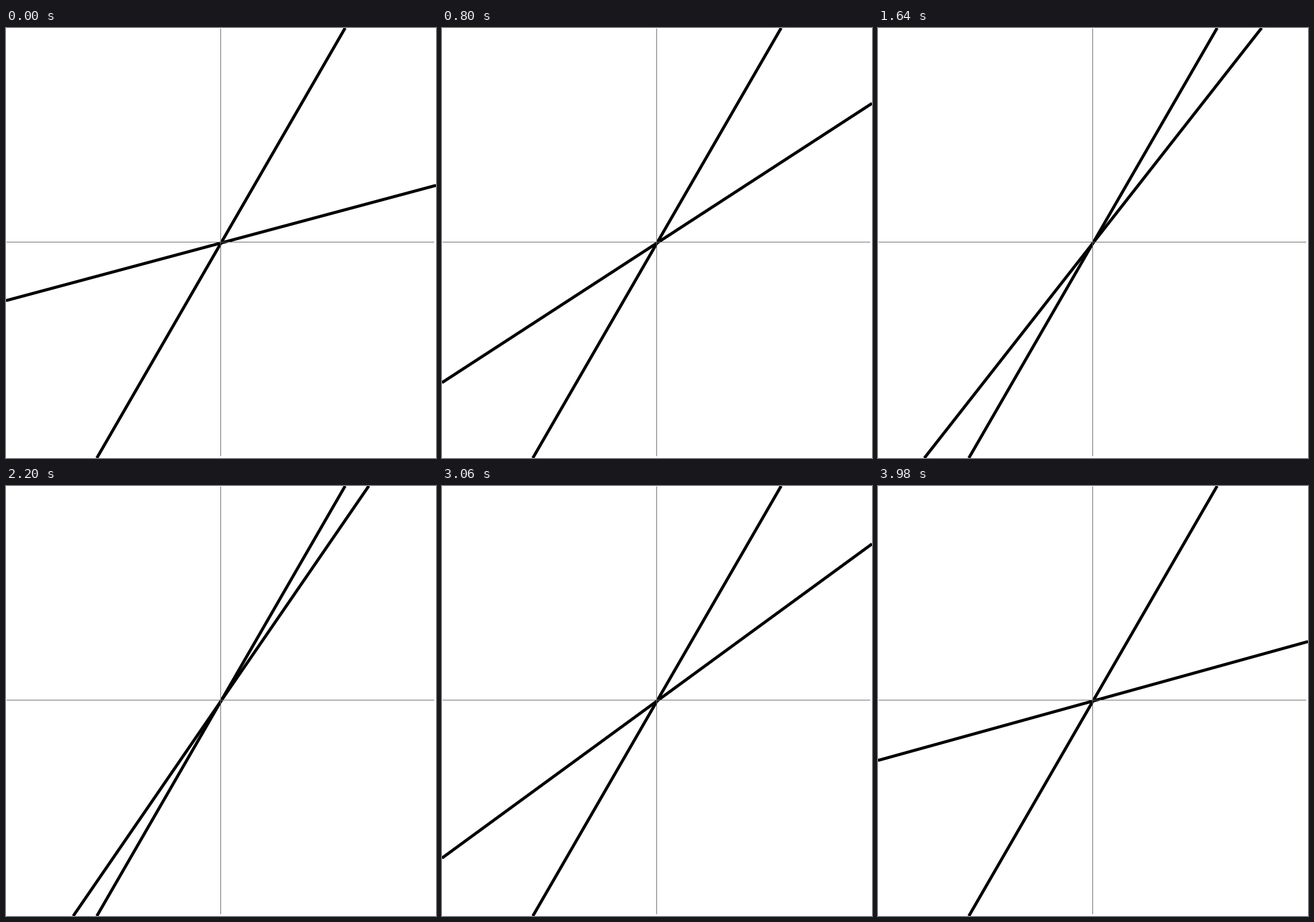
Animation of 720 by 720 pixels, one loop 4 s. Source, as a matplotlib script:

```python
import numpy as np
import matplotlib.pyplot as plt
from matplotlib.animation import FuncAnimation
from matplotlib.patches import Rectangle

SIZE, DPI = 720, 100
FRAMES, INTERVAL = 200, 20
MID = SIZE / 2
LOW, HIGH = 15, 60  # degrees
GRAY = "#666666"

fig = plt.figure(figsize=(SIZE / DPI, SIZE / DPI), dpi=DPI, facecolor="white")
ax = fig.add_axes([0, 0, 1, 1])
ax.set_xlim(0, SIZE)
ax.set_ylim(SIZE, 0)
ax.axis("off")


def chord(angle):
    """Line through the centre, ending exactly on the stage's border."""
    a = np.radians(angle)
    dx, dy = np.cos(a), -np.sin(a)
    reach = MID / max(abs(dx), abs(dy))
    ends = np.array([-reach, reach])
    return MID + ends * dx, MID + ends * dy


def add_line(angle):
    line, = ax.plot(*chord(angle), color="black", lw=5 * 72 / DPI,
                    solid_capstyle="butt", zorder=2)
    return line


def add_axis(x, y, w, h):
    ax.add_patch(Rectangle((x, y), w, h, fc=GRAY, lw=0,
                           antialiased=False, zorder=3))


add_line(HIGH)
mover = add_line(LOW)
add_axis(1, 358, 716, 1)
add_axis(359, 1, 1, 716)


def update(i):
    swing = 1 - abs(1 - 2 * i / FRAMES)
    mover.set_data(*chord(LOW + (HIGH - LOW) * swing))
    return mover,


anim = FuncAnimation(fig, update, frames=FRAMES, interval=INTERVAL,
                     repeat=True, repeat_delay=0)
plt.show()
```
